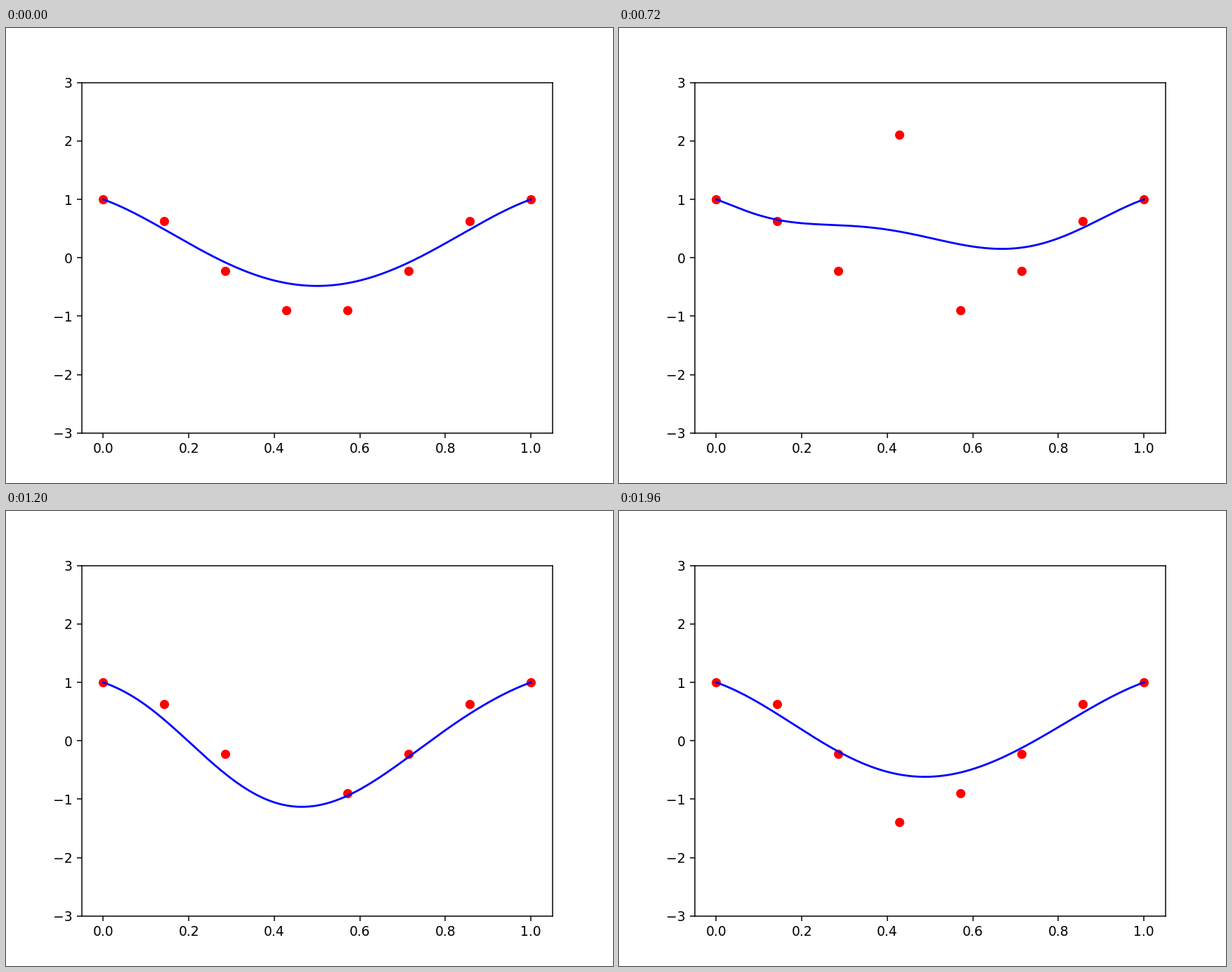
A matplotlib script that plays this animation: 864 by 648 pixels, repeating every 2 s.

```python
from math import comb

import matplotlib.pyplot as plt
import numpy as np
from matplotlib.animation import FuncAnimation

FRAMES = 50
INTERVAL = 40
DEGREE = 7
MOVING = 3
AMPLITUDE = 3.9

ctrl_x = np.linspace(0, 1, DEGREE + 1)
ctrl_y = np.cos(2 * np.pi * ctrl_x)

t = np.linspace(0, 1, 200)
basis = np.array([comb(DEGREE, k) * t**k * (1 - t)**(DEGREE - k)
                  for k in range(DEGREE + 1)])


def control_heights(frame):
    """Heights of the control points, one of them swinging on a sine."""
    y = ctrl_y.copy()
    y[MOVING] += AMPLITUDE * np.sin(2 * np.pi * frame / FRAMES)
    return y


fig, ax = plt.subplots(figsize=(6.4, 4.8), dpi=135)
ax.set_xlim(-0.05, 1.05)
ax.set_ylim(-3, 3)
dots, = ax.plot(ctrl_x, ctrl_y, "o", color="red")
curve, = ax.plot(ctrl_x @ basis, ctrl_y @ basis, color="blue")


def update(frame):
    y = control_heights(frame)
    dots.set_ydata(y)
    curve.set_ydata(y @ basis)
    return dots, curve


anim = FuncAnimation(fig, update, frames=FRAMES, interval=INTERVAL,
                     repeat=True, repeat_delay=0)
plt.show()
```
